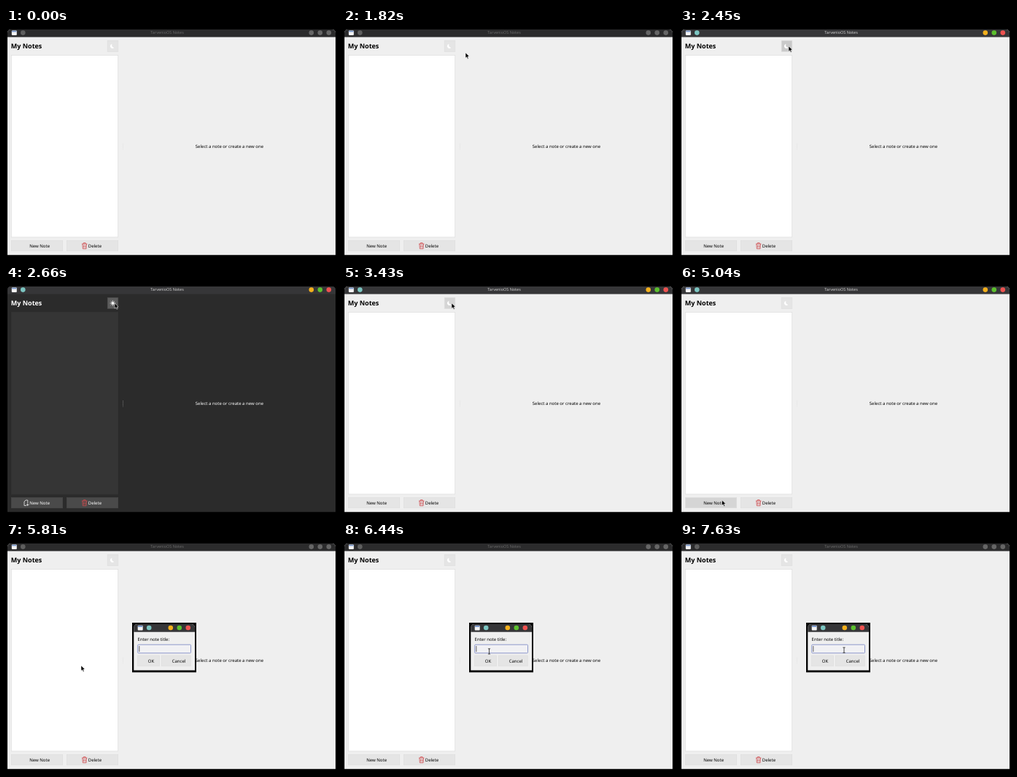
Animation, 454 px wide and 315 px high, one loop 8 s. Source, as an HTML page:

```html
<!DOCTYPE html>
<html lang="en">
<head>
<meta charset="utf-8">
<title>Notes</title>
<style>
  html, body { margin: 0; width: 100%; height: 100%; overflow: hidden; background: #000; }
  svg { display: block; width: 454px; height: 315px; }
  text { font: 6px "Noto Sans", "Open Sans", sans-serif; fill: var(--ink); text-rendering: geometricPrecision; }
  .caption { font-size: 5.45px; fill: var(--caption); }
  .heading { font-size: 9px; font-weight: 700; }
  svg {
    --ink: #000; --body: #efefef; --list: #fff; --edge: #dedede;
    --btn: #e5e5e5; --btnEdge: #dcdcdc; --hover: #d5d5d5; --press: #c9c9c9;
    --bar: #363638; --caption: #d2d2d2; --split: #e4e4e4;
    --teal: #7cc6c2; --amber: #f4b01c; --green: #5cc02e; --red: #ee5250;
  }
  svg.dark {
    --ink: #fff; --body: #2b2b2b; --list: #353535; --edge: #353535;
    --btn: #4a4a4a; --btnEdge: #4a4a4a; --hover: #5c5c5c; --press: #666; --split: #777;
  }
  #main.idle {
    --bar: #2b2b2c; --caption: #6a6a6a;
    --teal: #5f5f5f; --amber: #666; --green: #666; --red: #666;
  }
  .btn { fill: var(--btn); stroke: var(--btnEdge); stroke-width: .6; }
  .hover .btn { fill: var(--hover); }
  .press .btn { fill: var(--press); }
  .line { fill: none; stroke-width: .8; }
  .sun, .add { display: none; }
  .dark .sun, .dark .add { display: inline; }
  .dark .moon { display: none; }
</style>
</head>
<body>
<svg id="stage" viewBox="0 0 454 315">
  <defs>
    <g id="icon">
      <rect x="-3.5" y="-3.2" width="7" height="6.6" rx="1" fill="#f4f4f4"/>
      <rect x="-3.2" y="-2.9" width="6.4" height="1.9" rx=".6" fill="#7d9bd0"/>
    </g>
  </defs>

  <g id="main" class="idle">
    <path d="M2 312.2V7q0-5 5-5H447q5 0 5 5V312.2Z" fill="var(--body)"/>
    <path d="M2 12.5V7q0-5 5-5H447q5 0 5 5V12.5Z" fill="var(--bar)"/>
    <use href="#icon" x="11.3" y="6.6"/>
    <circle cx="23.3" cy="6.6" r="3.3" fill="var(--teal)"/>
    <circle cx="418.8" cy="6.6" r="3.3" fill="var(--amber)"/>
    <circle cx="430.8" cy="6.6" r="3.3" fill="var(--green)"/>
    <circle cx="442.8" cy="6.6" r="3.3" fill="var(--red)"/>
    <text class="caption" x="221" y="8.2" text-anchor="middle">TarvenioOS Notes</text>

    <text class="heading" x="6.8" y="28.2">My Notes</text>
    <g id="theme">
      <rect class="btn" x="139.2" y="17.3" width="14.6" height="15.2"/>
      <path class="moon" d="M145.5 22a3.1 3.1 0 1 0 2.9 5a3.4 3.4 0 0 1-2.9-5Z" fill="#fff"/>
      <g class="sun" stroke="#fff" stroke-width=".7">
        <circle cx="146.4" cy="25" r="1.7" fill="#fff" stroke="none"/>
        <path d="M146.4 21.2V28.8M142.6 25H150.2M143.7 22.3L149.1 27.7M149.1 22.3L143.7 27.7"/>
      </g>
    </g>
    <rect x="7.3" y="37.6" width="146.4" height="250.2" fill="var(--list)" stroke="var(--edge)" stroke-width=".7"/>
    <path d="M160.5 159V167.5" stroke="var(--split)" stroke-width=".8" stroke-dasharray="1 .6"/>

    <g id="add">
      <rect class="btn" x="7.3" y="292.4" width="70.4" height="14.4"/>
      <path class="add line" d="M28 303.4H25V298L27 296H29.8V300M29.6 300.5V304M27.9 302.2H31.5" stroke="#eee"/>
      <text x="32.2" y="302.2">New Note</text>
    </g>
    <g>
      <rect class="btn" x="83.3" y="292.4" width="70.4" height="14.4"/>
      <path class="line" d="M104 297H111.4M106.3 297V295.6H109.1V297M104.9 297L105.4 303.7H110L110.5 297M106.7 298.6V302.2M108.7 298.6V302.2" stroke="#cf4a4d"/>
      <text x="112.8" y="302.2">Delete</text>
    </g>
    <text x="306.4" y="164.6" text-anchor="middle">Select a note or create a new one</text>
  </g>

  <g id="dialog">
    <rect x="173" y="111" width="88" height="68.3"/>
    <path d="M175.3 176.6V118q0-5 5-5H254q5 0 5 5V176.6Z" fill="var(--body)"/>
    <path d="M175.3 123.8V118q0-5 5-5H254q5 0 5 5V123.8Z" fill="var(--bar)"/>
    <use href="#icon" x="184.2" y="118"/>
    <circle cx="196.2" cy="118" r="3.3" fill="var(--teal)"/>
    <circle cx="225.8" cy="118" r="3.3" fill="var(--amber)"/>
    <circle cx="237.8" cy="118" r="3.3" fill="var(--green)"/>
    <circle cx="249.8" cy="118" r="3.3" fill="var(--red)"/>
    <text x="180.6" y="135.8">Enter note title:</text>
    <rect x="180.7" y="141.2" width="72.8" height="11.6" rx="1" fill="#f1f1f4" stroke="#8d98cc" stroke-width="1"/>
    <path id="caret" d="M182.8 143V151" stroke="#222" stroke-width=".7"/>
    <rect class="btn" x="180.6" y="156" width="29.8" height="14.8"/>
    <text x="199" y="165.6" text-anchor="middle">OK</text>
    <rect class="btn" x="213.2" y="156" width="40.2" height="14.8"/>
    <text x="237" y="165.6" text-anchor="middle">Cancel</text>
  </g>

  <g id="pointer">
    <path id="arrow" d="M0 0V7.2L1.7 5.8L2.9 8.4L4.1 7.9L3 5.3L5.2 5Z" fill="#000" stroke="#fff" stroke-width=".5"/>
    <path id="beam" class="line" d="M-1.6 -3.4H1.6M0 -3.4V3.8M-1.6 3.8H1.6" stroke="#222"/>
  </g>
</svg>

<script>
  const LOOP = 8000, STEP = 70;

  // Pointer stops: time, x, y
  const PATH = [
    [1330, 214, 4], [1820, 168, 34], [2100, 149, 25], [3920, 149, 25],
    [4130, 148, 26], [4270, 148, 26], [4690, 98, 180], [5040, 57.5, 296],
    [5390, 57.5, 296], [5810, 103, 170], [6230, 176, 152], [6650, 225, 148.5]
  ];

  const $ = id => document.getElementById(id);
  const show = (id, on) => $(id).style.display = on ? "inline" : "none";
  const within = (t, from, to) => t >= from && t < to;
  const inBox = (p, x, y, w, h) => within(p.x, x, x + w) && within(p.y, y, y + h);

  function pointerAt(t) {
    const i = PATH.findIndex(stop => stop[0] > t);
    if (i < 0) {
      const [, x, y] = PATH[PATH.length - 1];
      return { x, y };
    }
    if (i === 0) return { x: -20, y: -20 };
    const [t0, x0, y0] = PATH[i - 1], [t1, x1, y1] = PATH[i];
    const k = (t - t0) / (t1 - t0);
    return { x: x0 + (x1 - x0) * k, y: y0 + (y1 - y0) * k };
  }

  function draw(now) {
    const t = Math.floor((now % LOOP) / STEP) * STEP;
    const p = pointerAt(t);
    const modal = t >= 5460;
    const overField = modal && inBox(p, 180, 141, 74, 12);

    $("stage").classList.toggle("dark", within(t, 2590, 3430));
    $("main").classList.toggle("idle", t < 2450 || modal);
    $("theme").classList.toggle("hover", inBox(p, 139, 17, 15, 16));
    $("theme").classList.toggle("press", within(t, 2450, 2590));
    $("add").classList.toggle("hover", !modal && inBox(p, 7, 292, 71, 15));
    $("add").classList.toggle("press", within(t, 5390, 5460));

    show("dialog", modal);
    show("caret", !within(t, 5950, 6440) && !within(t, 7000, 7490));
    show("arrow", !overField);
    show("beam", overField);
    $("pointer").setAttribute("transform", `translate(${p.x} ${p.y})`);
  }

  const start = performance.now();
  function tick() {
    draw(performance.now() - start);
    requestAnimationFrame(tick);
  }
  tick();
</script>
</body>
</html>
```
